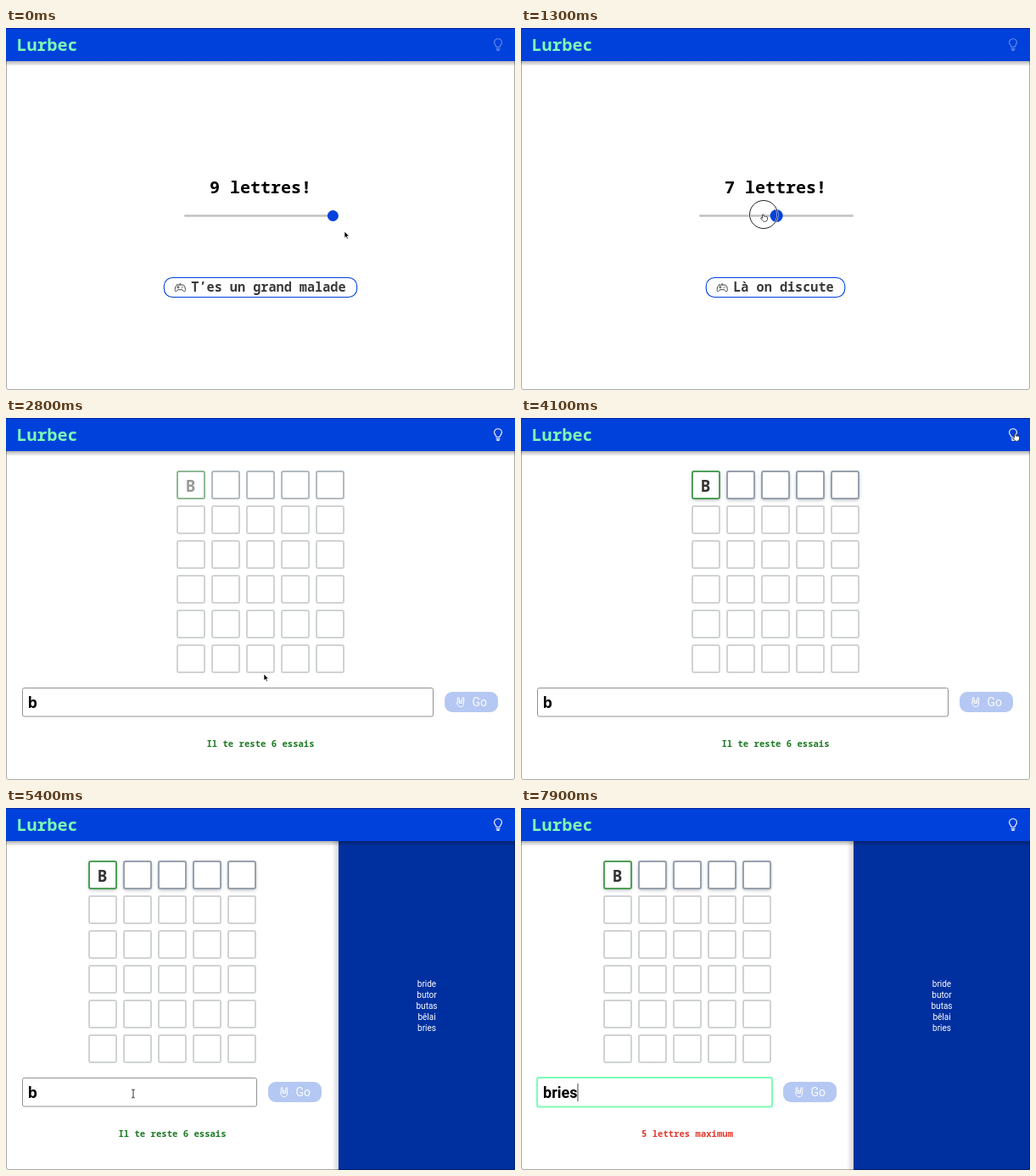
Animation, 600 px wide and 427 px high, one loop 8000 ms. Source, as an HTML page:

```html
<!DOCTYPE html>
<html lang="fr">
<head>
<meta charset="utf-8">
<title>Lurbec</title>
<style>
  html, body { margin: 0; width: 100%; height: 100%; overflow: hidden; background: #fff; }
  svg { display: block; width: 600px; height: 427px; }
  text { white-space: pre; }
  .mono { font-family: "Noto Sans Mono", "DejaVu Sans Mono", monospace; font-weight: 700; }
  .sans { font-family: Roboto, "Liberation Sans", sans-serif; }
  .mid { text-anchor: middle; }
  .line { fill: none; stroke-linecap: round; stroke-linejoin: round; }
</style>
</head>
<body>
<svg viewBox="0 0 600 427">
  <defs>
    <linearGradient id="drop" x2="0" y2="1">
      <stop stop-color="#000" stop-opacity=".3"/>
      <stop offset="1" stop-color="#000" stop-opacity="0"/>
    </linearGradient>
    <linearGradient id="side">
      <stop stop-color="#000" stop-opacity="0"/>
      <stop offset="1" stop-color="#000" stop-opacity=".16"/>
    </linearGradient>
    <filter id="soft" x="-30%" y="-30%" width="160%" height="170%">
      <feGaussianBlur stdDeviation="2"/>
    </filter>
  </defs>
  <rect width="600" height="427" fill="#fff"/>

  <g id="setup">
    <text id="count" class="mono" x="240" y="195" font-size="20"></text>
    <rect x="210" y="220.2" width="182" height="2.6" rx="1.3" fill="#c1c1c1"/>
    <circle id="thumb" cy="221.5" fill="#0041dc"/>
    <rect id="pill" y="294.5" height="23" rx="10" fill="#fff" stroke="#0041dc" stroke-width="1.1"/>
    <g id="pad" class="line" stroke="#444" stroke-width="1">
      <path d="M3 2.5H10C12 2.5 13 8 12.4 9.6 12 10.7 11 10.5 10.2 9.6L9 8.2H4L2.8 9.6C2 10.5 1 10.7 .6 9.6 0 8 1 2.5 3 2.5ZM3 5.3H5.4M4.2 4.1V6.5M6.5 2.5V.8M8.4 6h.2M9.6 4.6h.2"/>
    </g>
    <text id="label" class="mono" y="311" font-size="15.2" fill="#3a3a3a"></text>
  </g>

  <g id="game">
    <g id="grid"></g>
    <rect id="field" fill="#fff"/>
    <text id="typed" x="26" y="342" font-size="18"></text>
    <path id="caret" stroke="#333" stroke-width="1"/>
    <g id="go">
      <rect x="517" y="323" width="63" height="24" rx="9" fill="#b5c8f3"/>
      <path class="line" transform="translate(531 329)" stroke="#fff" d="M1.5 6.5 1.2 1.5a.9.9 0 0 1 1.8 0L3.4 5h3L7 1.5a.9.9 0 0 1 1.8.2L8.4 8c0 2.4-1.2 3.7-3.3 3.7C3 11.7 1.5 10.2 1 8.5L.2 6.8 1.5 6.5M3.4 5v2.4h3V5"/>
      <text class="sans" x="549.5" y="340" font-size="14" fill="#fafbff">Go</text>
    </g>
    <text id="note" class="mono mid" y="388" font-size="10.6"></text>
    <g id="panel">
      <rect x="592" y="39" width="8" height="388" fill="url(#side)"/>
      <rect x="600" y="39" width="210" height="388" fill="#0030a0"/>
      <g id="words" class="sans mid" font-size="10" fill="#fff"></g>
    </g>
  </g>

  <rect y="39" width="600" height="6" fill="url(#drop)"/>
  <rect width="600" height="39" fill="#0041dc"/>
  <text class="mono" x="12.5" y="27" font-size="20" fill="#7dfcb4">Lurbec</text>
  <path id="bulb" class="line" stroke="#fff" stroke-width="1.1" d="M578 22.5C578 20.5 575.6 19.7 575.6 17.1A4.4 4.4 0 0 1 584.4 17.1C584.4 19.7 582 20.5 582 22.5ZM578 24.6H582M578.8 26.4H581.2"/>
  <path d="M0 .5H600" stroke="#00259a"/>
  <path class="line" d="M.5 39V424Q.5 426.5 3 426.5H597Q599.5 426.5 599.5 424V39" stroke="#000" stroke-opacity=".33"/>

  <g id="ring" fill="none">
    <circle r="16.5" stroke="#fff" stroke-width="2.4" stroke-opacity=".7"/>
    <circle r="16.5" stroke="#222"/>
  </g>
  <g id="cursor">
    <path id="arrow" d="M0 0V7.6L1.8 6 3 8.8 4.3 8.2 3.1 5.6H5.5Z" fill="#000" stroke="#fff" stroke-width=".6"/>
    <path id="hand" d="M-1.5 4.5V.2Q-.8-1 0 .2V2.2Q.8 1.4 1.5 2.3 2.3 1.7 3 2.6 4.4 2.2 4.5 3.6V5.8Q4 8.4 1.6 8.4-.6 8.4-1.4 7L-3.6 4.4Q-3.4 2.8-1.5 4.5Z" fill="#fff" stroke="#222" stroke-width=".8"/>
    <path id="beam" class="line" d="M-1.5-5Q0-5 0-4V4Q0 5-1.5 5M1.5-5Q0-5 0-4M0 4Q0 5 1.5 5" stroke="#222" stroke-width=".9"/>
  </g>
</svg>
<script>
const LOOP = 8000, STEP = 100, PANEL = 208;
const $ = id => document.getElementById(id);
const set = (id, attrs) => { for (const k in attrs) $(id).setAttribute(k, attrs[k]); };
const move = (id, x, y = 0) => set(id, { transform: `translate(${x} ${y})` });
const show = (id, on) => { $(id).style.display = on ? '' : 'none'; };
const clamp = v => Math.max(0, Math.min(1, v));
const smooth = p => p * p * (3 - 2 * p);
const within = (t, a, b) => t >= a && t < b;

const labels = {
  9: 'T’es un grand malade', 8: 'Ça se complique', 7: 'Là on discute',
  6: 'Tranquille', 5: 'Petit joueur'
};

// Pointer stops: time, x, y, eased arrival
const stops = [
  [0, 399, 240, 0], [500, 385, 221, 1], [600, 385, 221, 0], [900, 355, 220, 0],
  [1300, 286, 220, 0], [1600, 220, 221, 0], [1700, 220, 221, 0], [2500, 304, 302, 1],
  [2900, 304, 302, 0], [4000, 583, 19, 1], [4600, 583, 19, 0], [5400, 150, 337, 1]
];
// Typed text: start time, value
const typing = [[0, 'b'], [6200, 'br'], [7000, 'bri'], [7200, 'brie'], [7500, 'bries']];

function pointerAt(t) {
  const i = stops.findIndex(s => s[0] > t);
  if (i < 0) return stops[stops.length - 1].slice(1, 3);
  const [a, ax, ay] = stops[i - 1], [b, bx, by, eased] = stops[i];
  let p = (t - a) / (b - a);
  if (eased) p = smooth(p);
  return [ax + (bx - ax) * p, ay + (by - ay) * p];
}

function buildGrid() {
  let html = '';
  for (let row = 0; row < 6; row++) for (let col = 0; col < 5; col++) {
    const x = 202 + 41 * col, y = 63 + 41 * row;
    const box = `x="${x}" y="${y}" width="32" height="32" rx="2"`;
    if (!row) html += `<rect class="glow" ${box} transform="translate(0 1.5)" fill="#5a6472" filter="url(#soft)"/>`;
    html += `<rect ${box} fill="#fff" stroke="#d0d3d4" stroke-width="2"/>`;
    if (!row) html += `<rect class="lit" ${box} fill="none" stroke="${col ? '#98a1ad' : '#4f9f58'}" stroke-width="2"/>`;
  }
  $('grid').innerHTML = html + '<text class="mono mid lit" x="217.5" y="87" font-size="19" fill="#333">B</text>';
}

function drawSetup(t, x) {
  const drag = within(t, 600, 1700);
  const n = t < 600 ? 9 : t >= 1600 ? 5 : Math.max(5, Math.min(9, Math.round(5 + (x - 217) / 42)));
  $('count').textContent = n + ' lettres!';
  set('thumb', { cx: 217 + 42.1 * (n - 5), r: drag ? 7.5 : 6.5 });
  const width = 45 + 9.12 * labels[n].length, left = 300 - width / 2;
  set('pill', { x: left, width });
  move('pad', left + 12.5, 300.5);
  set('label', { x: left + 32 });
  $('label').textContent = labels[n];
}

function drawGame(t) {
  const w = PANEL * (1 - (1 - clamp((t - 4110) / 230)) ** 3);
  const lit = smooth(clamp((t - 2850) / 300));
  const focus = t >= 5500;
  move('grid', -w / 2);
  move('go', -w);
  move('panel', -w);
  show('panel', w > 0);
  document.querySelectorAll('.lit').forEach(e => e.style.opacity = .5 + .5 * lit);
  document.querySelectorAll('.glow').forEach(e => e.style.opacity = .55 * lit);

  const pad = focus ? 0 : .5;
  set('field', {
    x: 19 + pad, y: 318 + pad, width: 485 - w - 2 * pad, height: 34.5 - 2 * pad, rx: 2,
    stroke: focus ? '#7dfcb4' : '#919191', 'stroke-width': focus ? 2 : 1
  });
  const text = typing.filter(k => k[0] <= t).pop()[1];
  $('typed').textContent = text;
  set('typed', { class: focus ? 'sans' : 'mono', 'font-weight': 700 });
  show('caret', focus && (t >= 7000 || t % 1000 < 700));
  if (focus) {
    const end = 26.5 + $('typed').getComputedTextLength();
    set('caret', { d: `M${end} 325V346`, 'stroke-opacity': t < 7000 ? .3 : .9 });
  }

  const full = t >= 7700;
  $('note').textContent = full ? '5 lettres maximum' : 'Il te reste 6 essais';
  set('note', { x: 300 - w / 2, fill: full ? '#e23a2e' : '#1c7a24' });
}

function drawPointer(t, x, y) {
  const hand = within(t, 500, 1700) || within(t, 2400, 2700) || within(t, 3900, 4800);
  const beam = t >= 5300;
  show('cursor', t < 6000);
  show('hand', hand);
  show('beam', beam);
  show('arrow', !hand && !beam);
  move('cursor', x, y);
  move('ring', x, y);
  show('ring', within(t, 600, 1700) || within(t, 2600, 2700) || within(t, 4200, 4300) || within(t, 5500, 5600));
}

function draw(time) {
  const t = Math.floor((time % LOOP) / STEP) * STEP;
  const playing = t >= 2700;
  const [x, y] = pointerAt(t);
  show('setup', !playing);
  show('game', playing);
  set('bulb', { 'stroke-opacity': playing ? 1 : .4 });
  if (playing) drawGame(t); else drawSetup(t, x);
  drawPointer(t, x, y);
}

buildGrid();
$('words').innerHTML = ['bride', 'butor', 'butas', 'bêlai', 'bries']
  .map((word, i) => `<text x="704" y="${211 + 13 * i}">${word}</text>`).join('');

const start = performance.now();
function tick(now) {
  draw(Math.max(0, now - start));
  requestAnimationFrame(tick);
}
draw(0);
requestAnimationFrame(tick);
</script>
</body>
</html>
```
